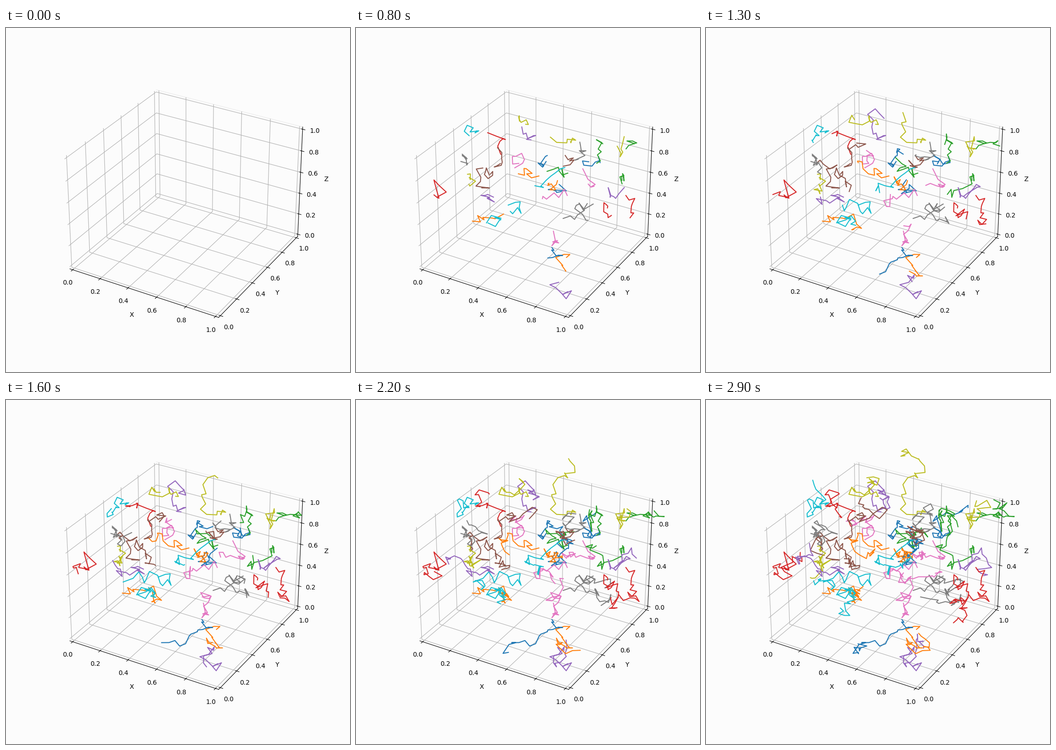
Recreate the animation shown at these times as a matplotlib script. Size 748 by 748 pixels, loop 3000 ms.

```python
import numpy as np
import matplotlib.pyplot as plt
from matplotlib.animation import FuncAnimation

NUM_WALKS = 40
NUM_STEPS = 30
MARGIN = 1 / 48
BACKGROUND = "#fcfcfc"
PANE_EDGE = "#ededed"

np.random.seed(19680801)


def random_walk(num_steps, max_step=0.05):
    """Return a 3D random walk as a (num_steps, 3) array."""
    start = np.random.random(3)
    steps = np.random.uniform(-max_step, max_step, size=(num_steps, 3))
    return start + np.cumsum(steps, axis=0)


def update(num):
    for line, walk in zip(lines, walks):
        line.set_data_3d(*walk[:num].T)
    return lines


walks = [random_walk(NUM_STEPS) for _ in range(NUM_WALKS)]

fig = plt.figure(figsize=(7.48, 7.48), dpi=100, facecolor=BACKGROUND)
ax = fig.add_subplot(projection="3d", facecolor=BACKGROUND)
lines = [ax.plot([], [], [])[0] for _ in walks]

limits = (-MARGIN, 1 + MARGIN)
ax.set(xlim3d=limits, ylim3d=limits, zlim3d=limits,
       xlabel="X", ylabel="Y", zlabel="Z")

for axis in (ax.xaxis, ax.yaxis, ax.zaxis):
    axis.set_pane_color(BACKGROUND)
ax.yaxis.pane.set_edgecolor(PANE_EDGE)

ani = FuncAnimation(fig, update, frames=NUM_STEPS, interval=100, repeat=True)
plt.show()
```
